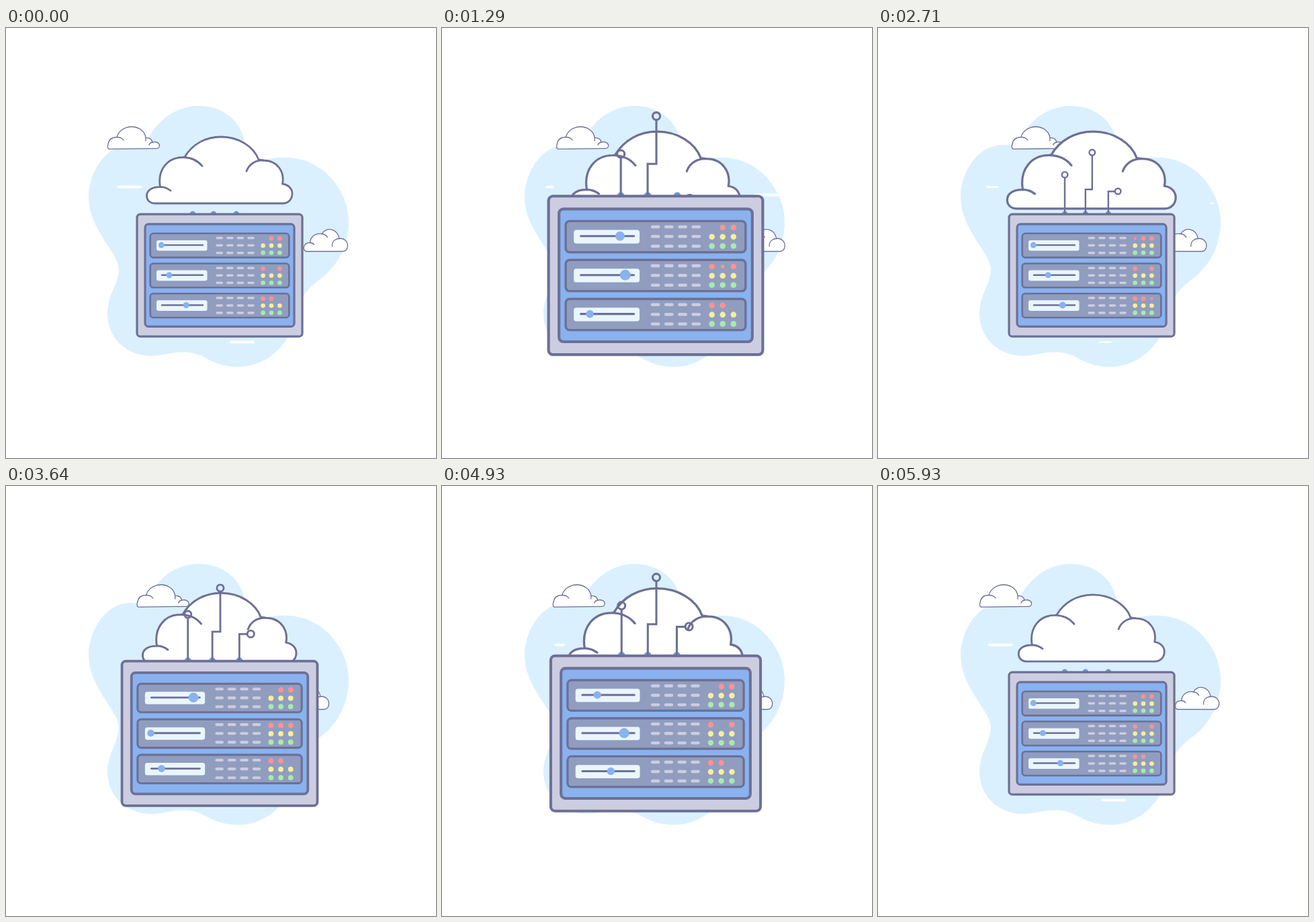
An HTML page that plays this animation: 640 by 640 pixels, repeating every 6000 ms.

```html
<!DOCTYPE html>
<html lang="en">
<head>
<meta charset="utf-8">
<title>Cloud server</title>
<style>
  html, body { margin: 0; width: 100%; height: 100%; overflow: hidden; background: #fff; }
  svg { display: block; width: 100vw; height: 100vh; }
  .ink { stroke: #6c7096; stroke-linejoin: round; stroke-linecap: round; }
  .open { fill: none; }
  .paper { fill: #fff; }
</style>
</head>
<body>
<svg viewBox="0 0 640 640">
  <path fill="#daf0fe" d="M287 116C318 116 347 134 354 165C360 192 368 200 384 197C396 193 406 192.5 418 193
    C468 193 510 238 510 290C510 325 492 355 470 372C452 384 436 402 432 425C428 452 416 467 407 477
    C390 495 368 504.5 345 504.5C322 504.5 306 496 293 489C283 484 274 482.5 263 482.5C244 482.5 235 488 216 488
    C180 488 151 462 151 425C151 398 168 380 168 359C168 335 123 300 123 252C123 218 146 174 186 174
    C200 174 207 173 213 162C228 136 254 116 287 116Z"/>
  <g id="streaks" fill="#fff"></g>
  <g id="leftCloud" class="ink" stroke-width="1.3">
    <path class="paper" d="M154 180.2C151 180 151 176 152 173C153 166 158 162.5 165 162.5C167 154 176 147 187 147
      C198 147 207 154 208 163.5C214 163 217 166 218 170C223 168.5 228.5 171 228.5 175C228.5 178 226 179.3 224 179.3Z"/>
    <path class="open" d="M165 162.5C169 162.5 173 164 175 167M208 163.5V168M218 170C215 170.5 213.5 172 213 174"/>
  </g>
  <g id="rightCloud" class="ink" stroke-width="1.3">
    <path class="paper" d="M446 332.5C440.5 331 441.5 319.5 452 319.5C453 309 461 305 470 306.5C475 296 492 297 495.5 313.5
      C503 312 508 318 508 324C508 329 505 332.5 501 332.5Z"/>
    <path class="open" d="M452 319.5C455 319.5 457 321 458 322.5M470 306.5C474 307 476.5 309 478 311.5M495.5 313.5C489 314 484.5 318 485 325"/>
  </g>
  <g id="bigCloud" class="ink" stroke-width="2.8">
    <path class="paper" d="M222 261C214 261 209.5 256 209.5 250C209.5 241 218 236.5 229.5 236.7C225 210 241 192.5 263 192.5L266 192
      C277 173 297 162 320 162C347 162 369 177 376 196L383 197C404 197 415 214 411.5 232
      C420 233 426 239 426 246.5C426 255 420 261 412 261Z"/>
    <path class="open" d="M229.5 236.7C236 236.5 241 239 245 242M265 192.5C276 193 286 198 292 205.5M358 213C362 202 372 196.5 383 197"/>
  </g>
  <g id="server"></g>
</svg>
<script>
const LOOP = 6000, HALF = LOOP / 2;
const byId = id => document.getElementById(id);

function set(el, attrs) {
  for (const key in attrs) el.setAttribute(key, attrs[key]);
}
function add(parent, tag, attrs) {
  const el = document.createElementNS('http://www.w3.org/2000/svg', tag);
  set(el, attrs);
  return parent.appendChild(el);
}

const clamp = x => Math.max(0, Math.min(1, x));
const smooth = u => u * u * (3 - 2 * u);
const ease = (t, from, to) => smooth(clamp((t - from) / (to - from)));
const wave = (t, period) => (1 - Math.cos(2 * Math.PI * t / period)) / 2;
const since = (t, start, period) => (t - start + period) % period;

// 0 -> 1 over `rise`, then back to 0 over `fall`
const swing = (t, rise, fall) => ease(t, 0, rise) - ease(t, rise, rise + fall);

// The server swells, holds, then drops back with a late fall.
function growth(time) {
  const t = time % HALF;
  return ease(t, 80, 1050) - smooth(clamp((t - 1500) / 1000) ** 2);
}

const streaks = [
  { x: 160, y: 236.5, start: 2640, life: 820, length: 37, speed: .013 },
  { x: 328, y: 467.5, start: 2640, life: 820, length: 37, speed: .013 },
  { x: 152, y: 236.5, start: 1180, life: 1340, length: 15, speed: .021 },
  { x: 465, y: 248.5, start: 1100, life: 600, length: 37, speed: 0 },
  { x: 446, y: 261, start: 1960, life: 800, length: 23, speed: .063 }
];
for (const s of streaks) s.el = add(byId('streaks'), 'rect', {});

function drawStreak(s, time) {
  const age = since(time, s.start, HALF);
  const edge = Math.min(age, s.life - age);
  const height = 4 * clamp(edge / 120);
  set(s.el, {
    x: s.x + s.speed * age, y: s.y - height / 2,
    width: s.length * clamp(edge / 140), height, rx: height / 2
  });
}

// Everything in the server is placed around its own centre.
const server = byId('server');
const box = (x, y, width, height, rx, fill, line) =>
  add(server, 'rect', { x, y, width, height, rx, fill, ...(line && { class: 'ink', 'stroke-width': line }) });

for (const x of [-40, -9.2, 24.8]) add(server, 'circle', { cx: x, cy: -91.3, r: 4.3, fill: '#6f96cf' });

// Wires slide up from behind the server and back down.
const wires = [
  { d: 'M-40 -75V-145.5', x: -40, y: -149.8, travel: 70, up: 610, down: 5090 },
  { d: 'M-9.2 -75V-128H.8V-178.4', x: .8, y: -182.9, travel: 105, up: 350, down: 4980 },
  { d: 'M24.8 -75V-125H34.8', x: 39.1, y: -125.2, travel: 43, up: 1080, down: 5090 }
];
for (const w of wires) {
  w.el = add(server, 'g', { class: 'ink open', 'stroke-width': 2.4 });
  add(w.el, 'path', { d: w.d, style: 'stroke-linejoin:miter' });
  add(w.el, 'circle', { cx: w.x, cy: w.y, r: 4.3 });
}

box(-123, -91, 246, 182, 5, '#cdcde1', 3.2);
box(-111, -76.3, 222, 152.5, 5, '#89b2ef', 3.2);

const units = [
  { period: HALF, swings: [{ start: 0, rise: 750, fall: 1900 }] },
  { period: HALF, swings: [{ start: 640, rise: 800, fall: 2200 }] },
  { period: LOOP, swings: [{ start: 1050, rise: 850, fall: 2550 }, { start: 4450, rise: 850, fall: 1750 }] }
];
const ledColors = ['#fd9294', '#f7ef9c', '#a6ecab'];

units.forEach((unit, row) => {
  const y = -44.5 + row * 44.7;
  box(-103.3, y - 17.9, 206.6, 35.8, 4.5, '#919dbf', 2.6);
  box(-94, y - 7.8, 75.5, 15.6, 3, '#eaf6fe');
  add(server, 'path', { d: `M-86 ${y - .6}H-25`, class: 'ink', 'stroke-width': 2.4 });
  unit.knob = add(server, 'circle', { cy: y - .6, fill: '#89b2ef' });
  for (let line = 0; line < 3; line++) {
    const dy = (line - 1) * 11.1;
    for (let c = 0; c < 4; c++) box(-5.6 + c * 15.6, y + dy - 1.9, 10.6, 3.5, 1.75, '#cdcde1');
    for (let c = 0; c < 3; c++) {
      const led = add(server, 'circle', {
        cx: 64.6 + c * 12.4, cy: y - 10.4 + line * 10.6, r: 3.3, fill: ledColors[line]
      });
      if (line === 0 && c === row) unit.blinker = led;
    }
  }
});

function drawUnit({ period, swings, knob, blinker }, row, time) {
  const level = swings.reduce((sum, s) => sum + swing(since(time, s.start, period), s.rise, s.fall), 0);
  set(knob, { cx: -86.7 + 57 * level, r: 4.5 + 1.7 * ease(level, .65, .95) });
  const distance = Math.abs(time % 2000 - (row % 2 ? 1500 : 500));
  set(blinker, { r: 3.3 * clamp((265 - distance) / 85) });
}

function render(t) {
  set(byId('leftCloud'), { transform: `translate(${49 * wave(t, LOOP)} 0)` });
  set(byId('rightCloud'), { transform: `translate(${5 - 32.5 * wave(t - 730, LOOP)} 0)` });
  set(byId('bigCloud'), {
    transform: `translate(318 211.5) scale(${1 + .196 * wave(t, 2000)}) translate(-318 -211.5)`
  });
  set(server, { transform: `translate(318 368.2) scale(${1 + .296 * growth(t)})` });
  for (const s of streaks) drawStreak(s, t);
  for (const w of wires) {
    const shown = ease(t, w.up, w.up + 900) - ease(t, w.down, w.down + 510);
    set(w.el, { transform: `translate(0 ${w.travel * (1 - shown)})` });
  }
  units.forEach((unit, row) => drawUnit(unit, row, t));
}

const start = performance.now();
function frame() {
  render((performance.now() - start) % LOOP);
  requestAnimationFrame(frame);
}
frame();
</script>
</body>
</html>
```
